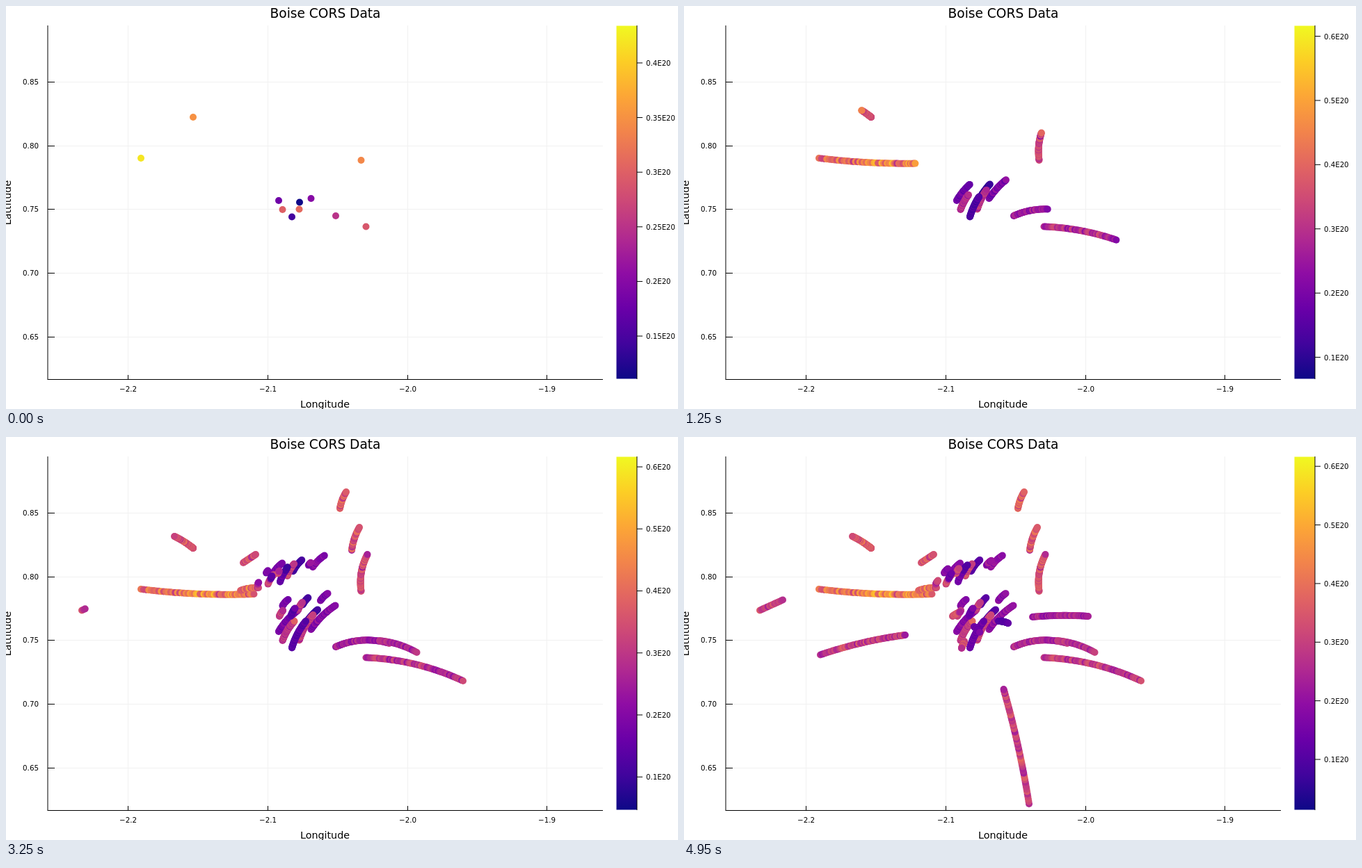
Recreate the animation shown at these times as an HTML page with a canvas. Size 966 by 580 pixels, loop 5 s.

```html
<!DOCTYPE html>
<html>
<head>
<meta charset="utf-8">
<style>
html, body { margin: 0; width: 966px; height: 580px; overflow: hidden; background: #fff; }
canvas { display: block; }
</style>
</head>
<body>
<canvas id="stage" width="966" height="580"></canvas>
<script>
const ctx = document.getElementById('stage').getContext('2d');
const FRAME_MS = 50, FRAMES = 100, DOTS_PER_FRAME = 2, RADIUS = 5, NOISE = .33;
const LEFT = 60, RIGHT = 858, TOP = 28, BOTTOM = 537;
const BAR_LEFT = 877.5, BAR_RIGHT = 907;
const PLASMA = ['#0d0887', '#41049d', '#6a00a8', '#8f0da4', '#b12a90', '#cc4778',
  '#e16462', '#f2844b', '#fca636', '#fcce25', '#f0f921'];
const FONT = '"DejaVu Sans", sans-serif';

// The colour range widens in steps as extreme values arrive: [frame, limit]
const LOWS = [[0, .1106], [6, .07], [25, .066], [54, .06], [61, .0465], [92, .0135]];
const HIGHS = [[0, .4343], [2, .5], [10, .5626], [17, .6168]];
const limitAt = (steps, frame) => steps.filter(s => s[0] <= frame).pop()[1];

let seed = 11;
function random() {
  seed = (seed * 16807) % 2147483647;
  return seed / 2147483647;
}

// A trail from (x, y) by (dx, dy), bowed sideways; rush > 0 starts fast, < 0 starts slow.
const dots = [];
function track(from, to, value, x, y, dx, dy, bend = .05, rush = 0) {
  const count = Math.round((to - from) * DOTS_PER_FRAME);
  for (let i = 0; i <= count; i++) {
    const u = i / count, p = u + rush * u * (1 - u), bow = 4 * bend * p * (1 - p);
    const frame = from + i / DOTS_PER_FRAME;
    const noise = frame ? (random() + random() - 1) * NOISE : 0;
    dots.push({
      frame,
      value: value * (1 + noise),
      x: x + dx * p + dy * bow,
      y: y + dy * p - dx * bow
    });
  }
}

// Central stations repeat the same drift in each pass, after a common jump.
const PASSES = [
  { from: 0, to: 34, share: 1, jump: [0, 0] },
  { from: 35, to: 46, share: .3, jump: [-21.5, -7] },
  { from: 49, to: 60, share: .48, jump: [-21.5, -38] },
  { from: 63, to: 67, share: .2, jump: [-23, 14] }
];
function station(value, x, y, dx, dy) {
  for (const { from, to, share, jump } of PASSES) {
    x += jump[0];
    y += jump[1];
    track(from, to, value, x, y, dx * share, dy * share);
    x += dx * share;
    y += dy * share;
  }
}

track(0, 34, .42, 194, 219, 162.5, 7, -.02, .6);
track(0, 35, .35, 269, 160, -27, -17, -.03, -.9);
track(0, 34, .34, 510.5, 222, 9, -53, .08);
station(.18, 392, 280, 27, -30);
station(.3, 397.5, 293, 17, -28);
station(.145, 411, 303.5, 20, -38.5);
station(.11, 422, 282.5, 26, -34);
station(.31, 421.5, 292.5, 20, -36.5);
station(.2, 438.5, 277, 35, -34.5);
track(0, 34, .25, 474, 302, 77, -5, .09, -.5);
track(0, 34, .29, 517.5, 317.5, 139.5, 33.5);

track(35, 46, .27, 537, 293, 53.5, 17);
track(35, 49, .35, 497, 163, 11, -33);
track(35, 46, .38, 337, 221, 26, -4);
track(49, 60, .36, 480, 103, 9, -24);
track(49, 61, .35, 341, 181, 18, -12, 0);

track(64, 71, .3, 109, 249.5, 33, -15, 0);
track(67, 99, .29, 196, 313.5, 122, -28.5, .025, .43);
track(66, 99, .3, 496, 528, -36.5, -165, -.015, .43);
track(74, 99, .24, 501, 259, 80, -1, .02);
track(75, 88, .33, 386, 258, 11, -6);
track(76, 99, .33, 403, 294, -4, 10, 0);
track(76, 92, .14, 417, 273, 8, 8);
track(76, 99, .11, 452, 265, 14, 3);
dots.sort((a, b) => a.frame - b.frame);

function plasma(u) {
  const pos = Math.min(1, Math.max(0, u)) * (PLASMA.length - 1);
  const i = Math.min(PLASMA.length - 2, Math.floor(pos));
  const channel = k => {
    const [a, b] = [i, i + 1].map(n => parseInt(PLASMA[n].substr(1 + 2 * k, 2), 16));
    return Math.round(a + (b - a) * (pos - i));
  };
  return `rgb(${[0, 1, 2].map(channel)})`;
}

function line(x1, y1, x2, y2, color = '#000') {
  ctx.strokeStyle = color;
  ctx.lineWidth = 1;
  ctx.beginPath();
  ctx.moveTo(x1, y1);
  ctx.lineTo(x2, y2);
  ctx.stroke();
}

function text(str, x, y, size, align = 'center') {
  ctx.font = `${size}px ${FONT}`;
  ctx.textAlign = align;
  ctx.fillStyle = '#000';
  ctx.fillText(str, x, y);
}

function drawAxes() {
  const ticks = [0, 1, 2, 3, 4];
  const xs = ticks.slice(0, 4).map(i => Math.round(175 + i * 200.8) + .5);
  const ys = ticks.map(i => Math.round(109 + i * 91.7) + .5);
  xs.forEach(x => line(x, TOP, x, BOTTOM, '#f1f1f1'));
  ys.forEach(y => line(LEFT, y, RIGHT, y, '#f1f1f1'));
  line(LEFT, TOP, LEFT, BOTTOM + 1);
  line(LEFT, BOTTOM + .5, RIGHT, BOTTOM + .5);
  xs.forEach((x, i) => {
    line(x, BOTTOM, x, BOTTOM - 6);
    text('\u2212' + (2.2 - i * .1).toFixed(1), x, 555, 10.3);
  });
  ys.forEach((y, i) => {
    line(LEFT, y, LEFT + 10, y);
    text((.85 - i * .05).toFixed(2), 47, y + 3.5, 10.3, 'right');
  });
  text('Boise CORS Data', 459, 17, 18.6);
  text('Longitude', 458.5, 578, 14.3);
  ctx.save();
  ctx.translate(7, 283);
  ctx.rotate(-Math.PI / 2);
  text('Lattitude', 0, 0, 14.3);
  ctx.restore();
}

function drawColorBar(low, high) {
  const fill = ctx.createLinearGradient(0, BOTTOM, 0, TOP);
  PLASMA.forEach((c, i) => fill.addColorStop(i / (PLASMA.length - 1), c));
  ctx.fillStyle = fill;
  ctx.fillRect(BAR_LEFT, TOP + .5, BAR_RIGHT - BAR_LEFT, BOTTOM - TOP - 1);
  line(BAR_RIGHT, TOP, BAR_RIGHT, BOTTOM);
  const step = high - low < .5 ? .05 : .1;
  for (let k = Math.ceil(low / step); k * step <= high; k++) {
    const y = BOTTOM - (k * step - low) / (high - low) * (BOTTOM - TOP);
    line(BAR_RIGHT, y, BAR_RIGHT + 8, y);
    text(+(k * step).toFixed(2) + 'E20', 920, y + 4, 10.2, 'left');
  }
}

function draw(frame) {
  ctx.fillStyle = '#fff';
  ctx.fillRect(0, 0, 966, 580);
  const low = limitAt(LOWS, frame), high = limitAt(HIGHS, frame);
  drawAxes();
  for (const dot of dots) {
    if (dot.frame > frame) break;
    ctx.fillStyle = plasma((dot.value - low) / (high - low));
    ctx.beginPath();
    ctx.arc(dot.x, dot.y, RADIUS, 0, Math.PI * 2);
    ctx.fill();
  }
  drawColorBar(low, high);
}

let shown = -1;
function tick() {
  const frame = Math.floor(performance.now() / FRAME_MS) % FRAMES;
  if (frame !== shown) draw(shown = frame);
  requestAnimationFrame(tick);
}
tick();
</script>
</body>
</html>
```
